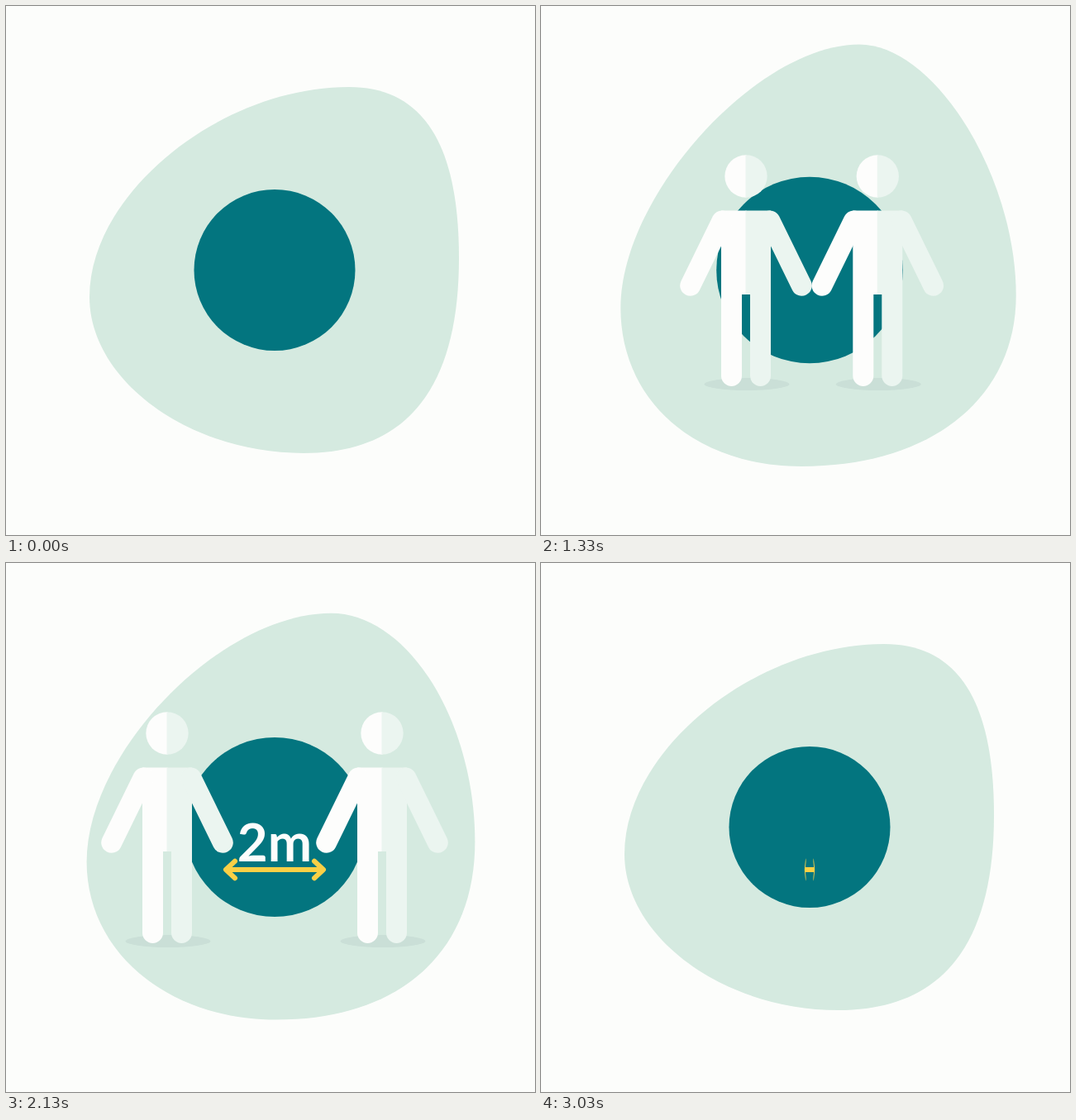
These frames come from a looping animation (640x640 px, 3.06 s). An HTML page:

```html
<!DOCTYPE html>
<html lang="en">
<head>
<meta charset="utf-8">
<title>Keep two metres apart</title>
<style>
  html, body { margin: 0; width: 100%; height: 100%; overflow: hidden; background: #fcfdfb; }
  svg { display: block; width: 100vw; height: 100vh; }
  .light { fill: #fdfdfc; stroke: #fdfdfc; }
  .shade { fill: #ebf5f0; stroke: #ebf5f0; }
  .arm { stroke-width: 25; stroke-linecap: round; }
  .solid { stroke: none; }
  .arrow { fill: none; stroke: #fad046; stroke-width: 6; stroke-linecap: round; stroke-linejoin: round; }
  text { font: 700 58px Lato, "Open Sans", sans-serif; fill: #fdfdfc; text-anchor: middle; }
</style>
</head>
<body>
<svg viewBox="0 0 640 640">
  <defs>
    <g id="half">
      <path class="solid" d="M.5-212.5H-30V-12.5a12.5 12.5 0 0 0 25 0V-111H.5Z"/>
      <path class="solid" d="M.5-279.7H0a25.7 25.7 0 0 0 0 51.4H.5Z"/>
      <path class="arm" d="M-29-200L-67.3-121.7"/>
    </g>
    <g id="person">
      <ellipse cx="1" cy="-2.5" rx="51.5" ry="7.5" fill="#cadfd7"/>
      <use href="#half" class="light"/>
      <use href="#half" class="shade" transform="scale(-1 1)"/>
    </g>
  </defs>
  <path id="blob" fill="#d5eae0"/>
  <circle id="disc" cx="325" cy="319.5" fill="#03757f"/>
  <use id="left" href="#person"/>
  <use id="right" href="#person"/>
  <g id="arrow"><path class="arrow" d="M-58 0H58M-48-10.2L-59 0L-48 10.2M48-10.2L59 0L48 10.2"/></g>
  <g id="label"><text y="19">2m</text></g>
</svg>
<script>
const LOOP = 3060, MID = 325, FLOOR = 460;
const $ = id => document.getElementById(id);
const mix = (a, b, k) => a + (b - a) * k;

// Smooth step from 0 to 1, starting at start and lasting span
function ramp(t, start, span) {
  const k = Math.min(1, Math.max(0, (t - start) / span));
  return k * k * (3 - 2 * k);
}

// 0 up to peak, then back to 1
const pop = (t, start, rise, settle, peak = 1.1) =>
  peak * ramp(t, start, rise) - (peak - 1) * ramp(t, start + rise, settle);

// 1 up to 1.1, then down to 0
const leave = (t, start) => 1 + 0.1 * ramp(t, start, 180) - 1.1 * ramp(t, start + 180, 330);

// Top, right, bottom and left points with the tension of the quarter that follows
const wide = [[415, 98, 0.67], [548, 305, 0.665], [360, 541, 0.535], [101, 352, 0.495]];
const tall = [[383, 43, 0.465], [576.5, 353, 0.6], [312, 558, 0.59], [96, 366, 0.422]];

function blobPath(k) {
  const pts = wide.map((p, i) => p.map((v, j) => mix(v, tall[i][j], k)));
  const quarters = pts.map(([x, y, pull], i) => {
    const [nx, ny] = pts[(i + 1) % 4];
    const dx = (nx - x) * pull, dy = (ny - y) * pull;
    return i % 2
      ? `C${x} ${y + dy} ${nx - dx} ${ny} ${nx} ${ny}`
      : `C${x + dx} ${y} ${nx} ${ny - dy} ${nx} ${ny}`;
  });
  return `M${pts[0][0]} ${pts[0][1]}${quarters.join("")}Z`;
}

function place(id, x, y, sx, sy = sx) {
  const el = $(id);
  el.style.display = sx > 0.002 ? "" : "none";
  el.setAttribute("transform", `translate(${x} ${y}) scale(${sx} ${sy})`);
}

function person(id, side, near, enter, t) {
  const gap = mix(near, 130, pop(t, 1430, 430, 270, 1.14));
  place(id, MID + side * gap, FLOOR, pop(t, enter, 570, 300) * leave(t, 2390));
}

function draw(t) {
  const swell = ramp(t, 20, 1545) - ramp(t, 1565, 1495);
  $("blob").setAttribute("d", blobPath(swell));
  $("disc").setAttribute("r", mix(97.5, 113.8, swell));
  person("left", -1, 77, 73, t);
  person("right", 1, 82.3, 233, t);
  place("arrow", MID, 371, ramp(t, 1530, 370) - ramp(t, 2700, 410), 1);
  place("label", MID, 340, pop(t, 1900, 220, 140) * leave(t, 2450));
}

let start;
function tick(now) {
  start ??= now;
  draw(Math.max(0, now - start) % LOOP);
  requestAnimationFrame(tick);
}
draw(0);
requestAnimationFrame(tick);
</script>
</body>
</html>
```
